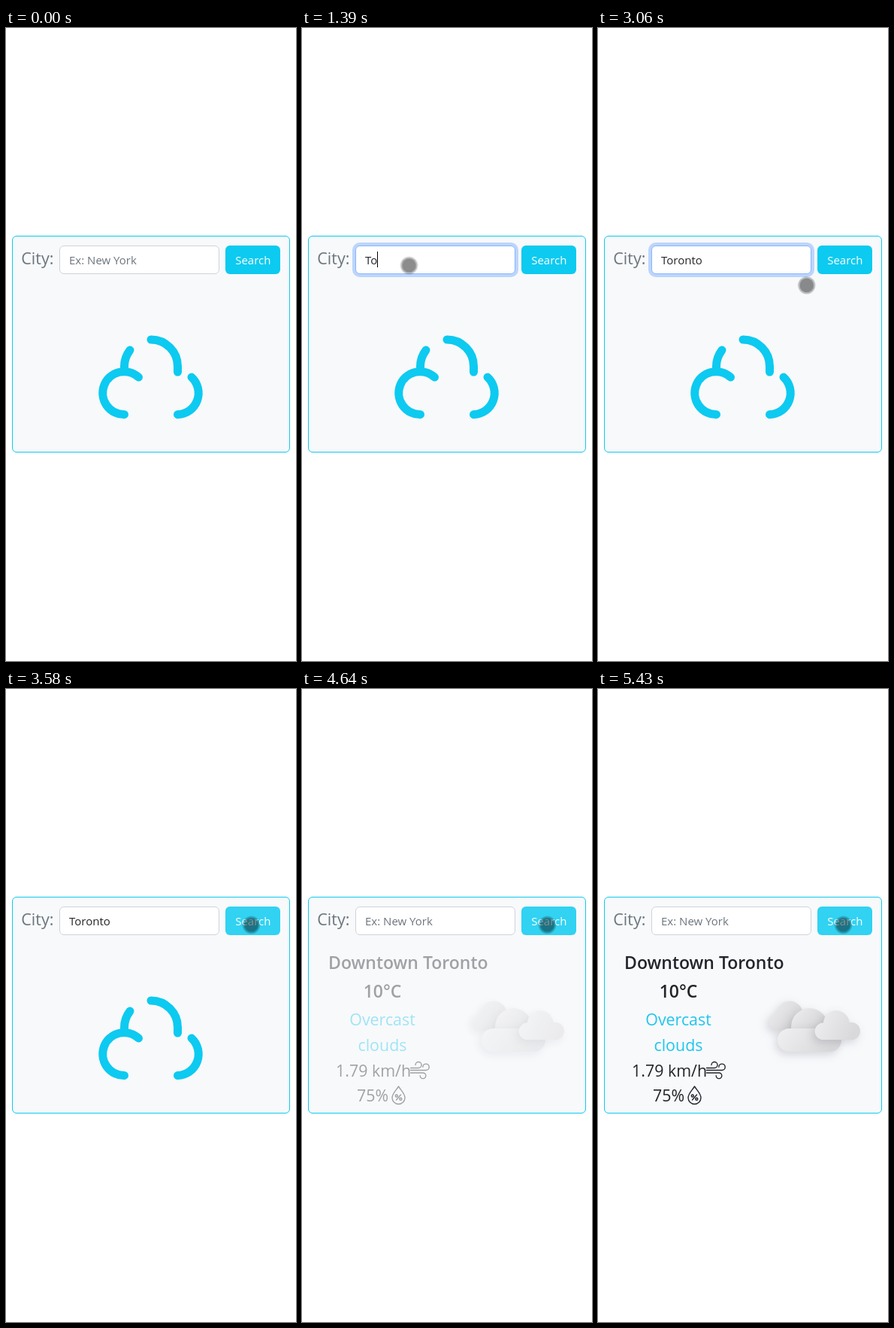
An HTML page without scripts for the animation above (6550 ms loop, 386 by 841 pixels).

```html
<!DOCTYPE html>
<html lang="en">
<head>
<meta charset="utf-8">
<title>Weather search</title>
<style>
  html, body { margin: 0; width: 100%; height: 100%; overflow: hidden; background: #fff; }
  svg { display: block; width: 386px; height: 841px; }
  text { font-family: "Open Sans", "Noto Sans", sans-serif; fill: #212529; }

  .loop { animation: 6550ms linear infinite; }
  .hard { animation-timing-function: step-end; }

  .label { font-size: 21.5px; fill: #6c757d; }
  .small { font-size: 15px; }
  .hint { fill: #6c757d; animation-name: hint; }
  .button { fill: #0dcaf0; animation-name: hover; }
  .button-text { fill: #fff; text-anchor: middle; }
  .field { fill: #fff; stroke: #ced4da; animation-name: border; }
  .ring { fill: #0d6efd; fill-opacity: .25; animation-name: ring; }
  .typed { animation-name: typed; }
  .caret { animation-name: caret; }
  .bar { fill: #000; animation-name: bar; }

  .loader { fill: none; stroke: #0dcaf0; stroke-width: 11; stroke-linecap: round; animation-name: loader; }

  .result { animation-name: reveal; }
  .result text { font-size: 21.4px; text-anchor: middle; }
  .result .strong { font-size: 23px; font-weight: 600; }
  .result .info { fill: #1fc6ee; }
  .result .start { text-anchor: start; }
  .icon { fill: none; stroke: #212529; stroke-width: 1.4; stroke-linecap: round; stroke-linejoin: round; }
  .puff { filter: drop-shadow(-3px 4px 6px rgba(40, 40, 60, .17)); }

  .pointer { animation-name: move; }

  @keyframes hint {
    0%, 61.68% { opacity: 1; }
    15.27% { opacity: 0; }
  }
  @keyframes typed {
    0%, 61.68% { opacity: 0; }
    8.09% { opacity: 1; }
  }
  @keyframes bar {
    0% { opacity: 1; }
    45%, 100% { opacity: 0; }
  }
  @keyframes caret {
    0% { transform: translateX(84px); }
    15.27% { transform: translateX(92px); }
    21.22% { transform: translateX(100px); }
    24.27% { transform: translateX(105px); }
    27.33% { transform: translateX(115px); }
    31.3% { transform: translateX(124px); }
    34.35% { transform: translateX(129px); }
    36.34%, 100% { transform: translateX(138px); }
  }
  @keyframes ring {
    0%, 7.9%, 51.6%, 100% { opacity: 0; }
    9.16%, 49.4% { opacity: 1; }
  }
  @keyframes border {
    0%, 7.9%, 51.6%, 100% { stroke: #ced4da; }
    9.16%, 49.4% { stroke: #86b7fe; }
  }
  @keyframes hover {
    0%, 48% { fill: #0dcaf0; }
    50.3%, 100% { fill: #31d2f2; }
  }
  @keyframes loader {
    0% { opacity: 1; }
    61.68%, 100% { opacity: 0; }
  }
  @keyframes reveal {
    0%, 67.02% { opacity: 0; animation-timing-function: ease; }
    82.3%, 100% { opacity: 1; }
  }
  @keyframes move {
    0%, 1.97% { opacity: 0; transform: translate(346.5px, 800px); }
    1.98% { opacity: 1; transform: translate(346.5px, 800px); animation-timing-function: ease-in-out; }
    7.02%, 13.12% { transform: translate(143.5px, 318px); }
    13.13%, 42.9% { transform: translate(142.5px, 315.5px); }
    42.9% { animation-timing-function: ease-in; }
    46.72% { transform: translate(277.5px, 342px); animation-timing-function: ease-out; }
    51.6%, 54.65% { transform: translate(323px, 314px); }
    54.66%, 100% { opacity: 1; transform: translate(326.5px, 313.5px); }
  }
</style>
</head>
<body>
<svg viewBox="0 0 386 841" xmlns="http://www.w3.org/2000/svg">
  <defs>
    <linearGradient id="back" x1="0" y1="0" x2="1" y2=".6">
      <stop offset="0" stop-color="#efeff0"/><stop offset="1" stop-color="#d3d3d6"/>
    </linearGradient>
    <linearGradient id="front" x1="0" y1="0" x2="1" y2=".3">
      <stop offset="0" stop-color="#f0f0f1"/><stop offset="1" stop-color="#d9d9dc"/>
    </linearGradient>
  </defs>

  <rect x="8.5" y="276.5" width="369" height="287" rx="5.5" fill="#f8f9fb" stroke="#0dcaf0"/>
  <text class="label" x="20.3" y="314">City:</text>

  <rect class="loop ring" x="67" y="285" width="221" height="46" rx="10"/>
  <rect class="loop field" x="71.5" y="289.5" width="212" height="37" rx="5.5"/>
  <g class="loop hard typed">
    <text class="small" x="84" y="314">Toronto</text>
    <g class="loop hard caret">
      <rect x="1" y="296" width="62" height="24" fill="#fff"/>
      <rect class="loop hard bar" y="297" width="1" height="21"/>
    </g>
  </g>
  <text class="small loop hard hint" x="84" y="314">Ex: New York</text>

  <rect class="loop button" x="292" y="289" width="73" height="38" rx="6"/>
  <text class="small button-text" x="328.8" y="314">Search</text>

  <path class="loop hard loader" d="M157.5 513.5A28.5 28.5 0 1 1 176.5 464
    M157.5 456V449.5A35.5 35.5 0 0 1 165 428
    M193 414A35.5 35.5 0 0 1 228.5 449.5V457
    M247 464A28.5 28.5 0 0 1 228.5 513.5"/>

  <g class="loop result">
    <text class="strong" x="141.3" y="372">Downtown Toronto</text>
    <text class="strong" x="107" y="410">10°C</text>
    <text class="info" x="107" y="447">Overcast</text>
    <text class="info" x="107" y="481">clouds</text>
    <text class="start" x="45" y="515">1.79 km/h</text>
    <text class="start" x="73" y="548">75%</text>

    <path class="icon" d="M144.5 503.5H155A4 4 0 1 0 151 499.5
      M144.5 506.5H165A4.2 4.2 0 1 0 160.8 502.3
      M144.5 510H161A3.8 3.8 0 1 1 157.2 513.8"/>
    <path class="icon" d="M128.5 528C124.5 534 120 538 120 543A8.5 8.5 0 0 0 137 543C137 538 132.5 534 128.5 528Z
      M125.5 546L131.5 539"/>
    <g class="icon">
      <circle cx="125.8" cy="540.5" r="1.5"/>
      <circle cx="131.3" cy="544.7" r="1.5"/>
    </g>

    <path class="puff" fill="url(#back)" d="M235.5 453A11.5 11.5 0 0 1 238 430.5A17.3 17.3 0 0 1 272.3 429Q276 440 275 453Z"/>
    <path class="puff" fill="url(#back)" d="M257 456V449A24.5 25 0 0 1 306 449V456Z"/>
    <rect class="puff" x="239" y="451" width="85" height="31" rx="15.5" fill="url(#front)"/>
    <path class="puff" fill="url(#front)" d="M297.5 466A11.5 11.5 0 0 1 300 443.3A17.3 17.3 0 0 1 334.5 443H337.5A11.5 11.5 0 0 1 337.5 466Z"/>
  </g>

  <g class="loop pointer">
    <circle r="10.5" fill="none" stroke="#000" stroke-opacity=".24" stroke-width="2"/>
    <circle r="9.5" fill-opacity=".45"/>
  </g>
</svg>
</body>
</html>
```
